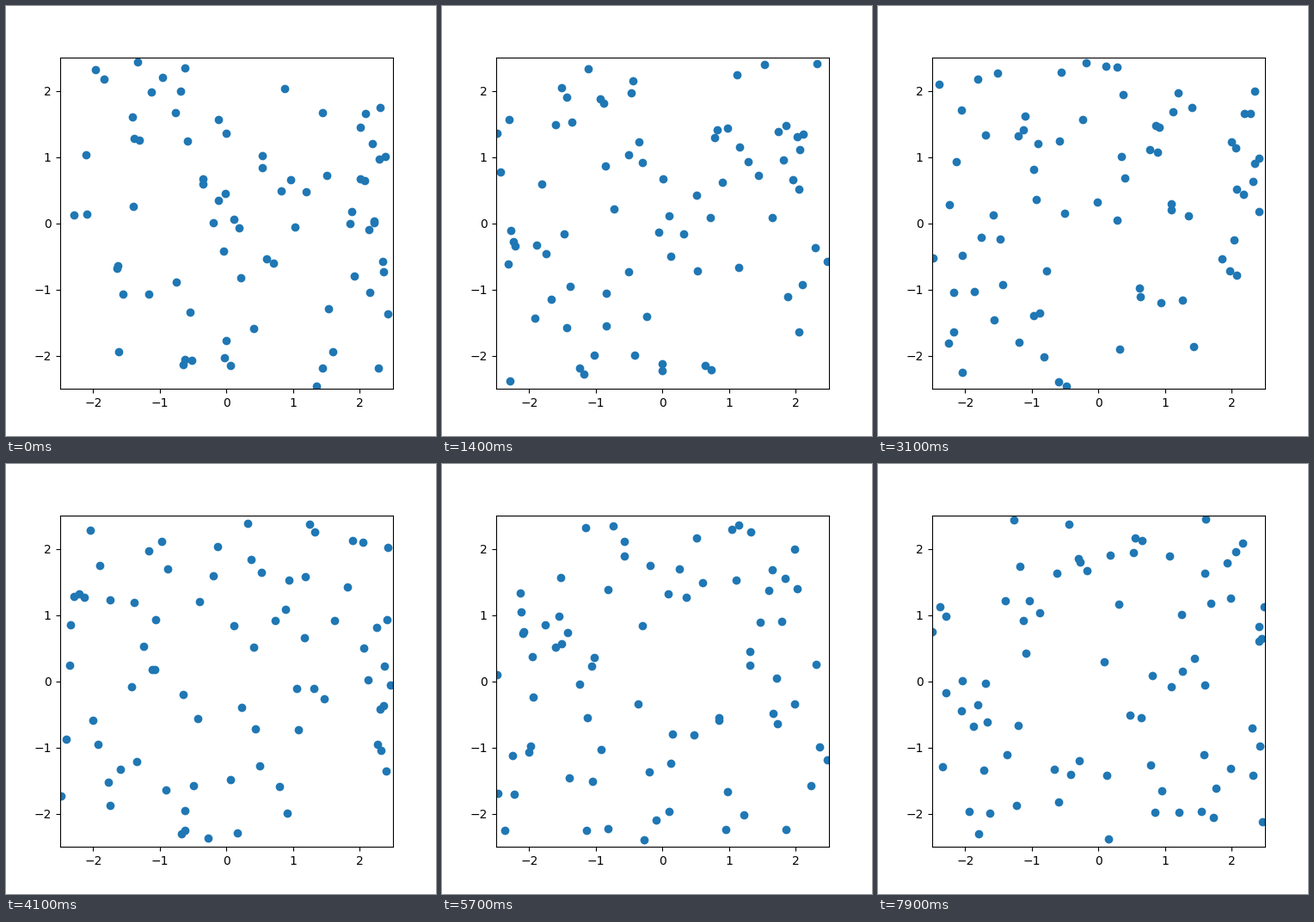
Recreate the animation shown at these times as a matplotlib script. Size 500 by 500 pixels, loop 8000 ms.

```python
import numpy as np
import matplotlib.pyplot as plt
from matplotlib.animation import FuncAnimation

FRAMES, INTERVAL = 80, 100
COUNT = 75
HALF = 2.5      # half width of the periodic box
SPEED = 0.055   # distance covered per frame
TURN = 0.6      # spread of the heading change per frame


def wrap(p):
    return (p + HALF) % (2 * HALF) - HALF


def make_paths():
    """Wandering particles: constant speed, slowly changing heading."""
    rng = np.random.default_rng(4)
    start = rng.uniform(-HALF, HALF, (1, 2, COUNT))
    heading = rng.uniform(-np.pi, np.pi, COUNT)
    turns = rng.normal(0, TURN, (FRAMES - 1, COUNT))
    heading = heading + np.cumsum(turns, axis=0)
    steps = SPEED * np.stack([np.cos(heading), np.sin(heading)], axis=1)
    return wrap(np.cumsum(np.concatenate([start, steps]), axis=0))


paths = make_paths()

fig, ax = plt.subplots(figsize=(5, 5), dpi=100)
ax.set(xlim=(-HALF, HALF), ylim=(-HALF, HALF),
       xticks=range(-2, 3), yticks=range(-2, 3))
dots, = ax.plot(*paths[0], "o", color="#1f77b4", markersize=6)


def update(i):
    dots.set_data(*paths[i])
    return dots,


anim = FuncAnimation(fig, update, frames=FRAMES, interval=INTERVAL,
                     repeat=True, repeat_delay=0, blit=False)
plt.show()
```
